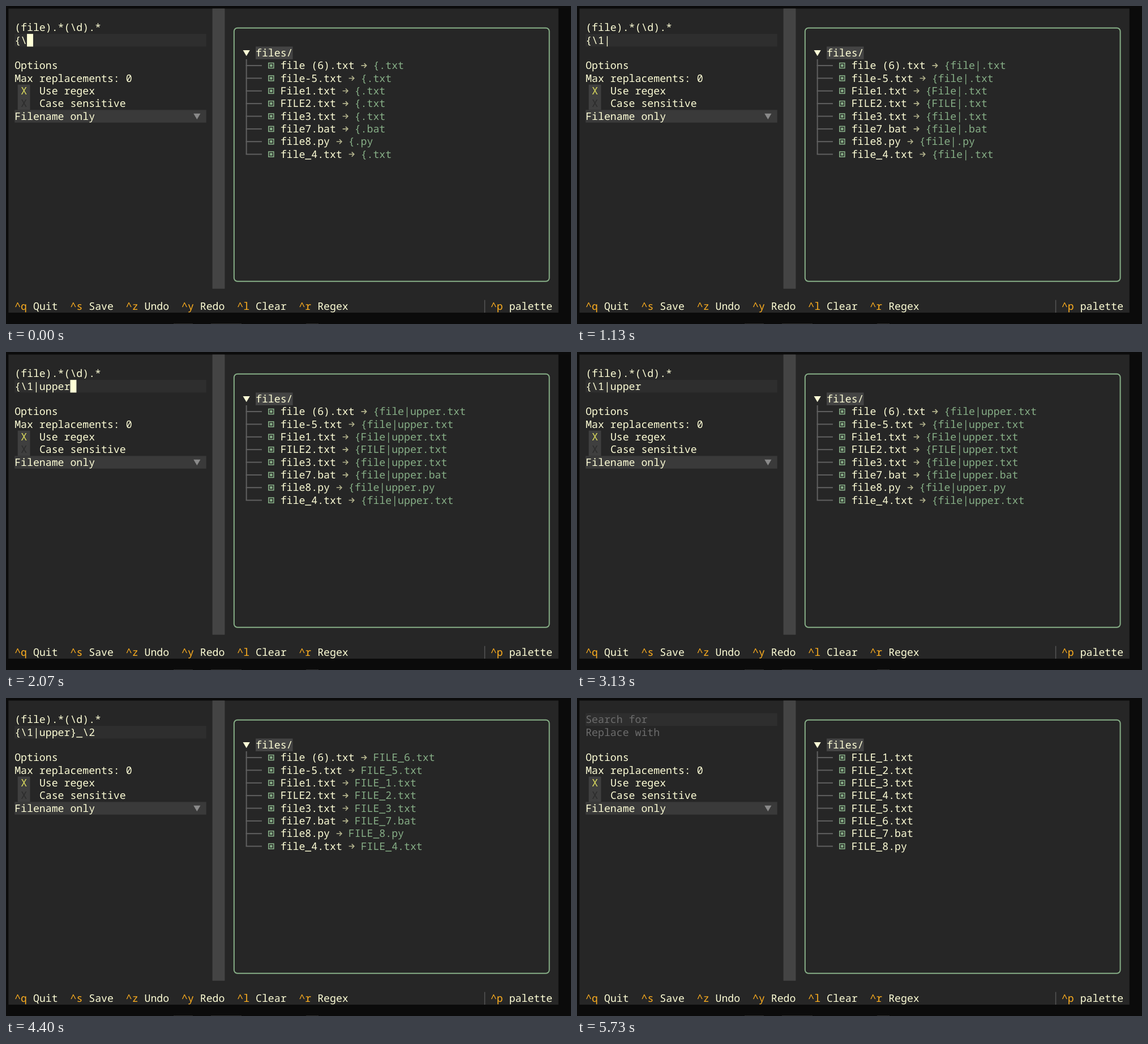
Write an HTML page that moves like this. It is 998 px wide and 561 px high and loops after 6 s.

```html
<!DOCTYPE html>
<html lang="en">
<head>
<meta charset="utf-8">
<title>Batch rename</title>
<style>
  html, body { margin: 0; width: 100%; height: 100%; overflow: hidden; background: #0b0b0b; }
  svg { display: block; width: 100vw; height: 100vh; }
  text {
    font: 500 18.2px "Noto Sans Mono", "DejaVu Sans Mono", monospace;
    font-variant-ligatures: none; white-space: pre; fill: #ffffd7;
    text-rendering: geometricPrecision;
  }
  .key { fill: #ffaf1f; }
  .green { fill: #87af87; }
  .hint { fill: #6c6c6c; }
  .on { fill: #dfdf5f; }
  .off { fill: #2b2b2b; }
</style>
</head>
<body>
<svg id="stage" viewBox="0 0 998 561"></svg>
<script>
const CELL_W = 10.918, CELL_H = 22.354;
const col = c => 4.3 + c * CELL_W;
const row = r => 4.5 + r * CELL_H;
const mid = r => row(r + 0.5);
const stage = document.getElementById('stage');

function add(tag, attrs, parent = stage) {
  const node = document.createElementNS('http://www.w3.org/2000/svg', tag);
  for (const name in attrs) node.setAttribute(name, attrs[name]);
  parent.append(node);
  return node;
}

function text(c, r, content = '', cls = '', parent = stage) {
  const node = add('text', { x: col(c), y: row(r) + 17.4, class: cls }, parent);
  node.textContent = content;
  return node;
}

const block = (c, r, cols, rows, fill) =>
  add('rect', { x: col(c), y: row(r), width: cols * CELL_W, height: rows * CELL_H, fill });

const triangle = (c, r, fill) =>
  add('path', { d: `M${col(c) - 0.6} ${mid(r) - 4.8}h12.2l-6.1 10.2z`, fill });

const stroke = (d, color, width, parent) =>
  add('path', { d, fill: 'none', stroke: color, 'stroke-width': width }, parent);

// Window, divider and panel
stroke('M296 560.5h34M362 560.5h54M530 560.5h22', '#2a2a2a', 1);
add('rect', { x: 4.3, y: 4.5, width: 971.5, height: 536.5, fill: '#262626' });
add('rect', { x: col(33), y: 4.5, width: 2 * CELL_W, height: 494.3, fill: '#444' });
add('rect', { x: col(36.5), y: mid(1) + 0.7, width: 51 * CELL_W, height: 20 * CELL_H,
  rx: 6, fill: 'none', stroke: '#87af87', 'stroke-width': 2 });

// Inputs
const focusBar = block(1, 2, 31, 1, '#2e2e2e');
const search = text(1, 1);
const replace = text(1, 2);
const cursor = block(3, 2, 1, 1, '#ffffd7');

// Options
block(1.5, 6, 2, 2, '#3f3f3f');
block(1, 8, 31, 1, '#3a3a3a');
text(1, 4, 'Options');
text(1, 5, 'Max replacements: 0');
text(2, 6, 'X', 'on');
text(5, 6, 'Use regex');
text(2, 7, 'X', 'off');
text(5, 7, 'Case sensitive');
text(1, 8, 'Filename only');
triangle(30, 8, '#8a8a8a');

// Tree
block(40, 3, 6, 1, '#444');
triangle(38, 3, '#ffffd7');
text(40, 3, 'files/');
const trunk = col(38.5);
stroke(`M${trunk} ${row(4)}V${mid(11)}`, '#606060', 2);
for (let r = 4; r < 12; r++) {
  stroke(`M${trunk - 1} ${mid(r)}H${col(41)}`, '#606060', 2);
  add('rect', { x: col(42) + 1, y: mid(r) - 4.5, width: 9, height: 9,
    fill: 'none', stroke: '#87af87', 'stroke-width': 1.6 });
  add('rect', { x: col(42) + 3.3, y: mid(r) - 2.2, width: 4.4, height: 4.4, fill: '#87af87' });
}
const list = add('g', {});

// Footer
const keys = [[1, '^q', 'Quit'], [10, '^s', 'Save'], [19, '^z', 'Undo'], [28, '^y', 'Redo'],
  [37, '^l', 'Clear'], [47, '^r', 'Regex'], [78, '^p', 'palette']];
for (const [c, key, label] of keys) {
  text(c, 23, key, 'key');
  text(c + 3, 23, label);
}
stroke(`M${col(77) + 0.6} ${row(23)}v${CELL_H}`, '#585858', 1.4);

const before = ['file (6).txt', 'file-5.txt', 'File1.txt', 'FILE2.txt',
  'file3.txt', 'file7.bat', 'file8.py', 'file_4.txt'];

function rename(name, template) {
  const [stem, ext] = name.split('.');
  const [, word, digit] = stem.match(/(file).*(\d).*/i);
  const filled = template.replace('\\1', word).replace('\\2', digit).replace(/\\$/, '');
  return filled.replace(/\{(\w+)\|upper\}/, (_, s) => s.toUpperCase()) + '.' + ext;
}

const finalTemplate = '{\\1|upper}_\\2';
const after = before.map(name => rename(name, finalTemplate)).sort();

// Start time, typed characters, characters used by the preview, cursor shown
const steps = [
  [0, 2, 2, 1], [70, 3, 2, 1], [130, 3, 3, 1], [400, 4, 3, 1], [470, 4, 4, 1], [930, 4, 4, 0],
  [1470, 5, 4, 1], [1530, 6, 5, 1], [1600, 7, 6, 1], [1730, 8, 7, 1], [1800, 9, 9, 1],
  [2270, 9, 9, 0], [3400, 12, 12, 0], [4070, 12, 12, 1], [4130, 13, 12, 1],
  [4200, 13, 13, 1], [4400, 13, 13, 0], [5670, 0, 0, 0]
];

function setInput(node, value, hint) {
  node.textContent = value || hint;
  node.setAttribute('class', value ? '' : 'hint');
}

function drawList(template) {
  list.replaceChildren();
  (template ? before : after).forEach((name, i) => {
    const r = i + 4, end = 44 + name.length;
    text(44, r, name, '', list);
    if (!template) return;
    const x = col(end + 1), y = mid(r);
    stroke(`M${x + 0.8} ${y}h9M${x + 6} ${y - 4}l4 4l-4 4`, '#b5b58e', 1.6, list);
    text(end + 3, r, rename(name, template), 'green', list);
  });
}

function show([, typed, used, blink]) {
  setInput(search, typed ? '(file).*(\\d).*' : '', 'Search for');
  setInput(replace, finalTemplate.slice(0, typed), 'Replace with');
  focusBar.setAttribute('y', row(typed ? 2 : 1));
  cursor.setAttribute('x', col(1 + typed));
  cursor.setAttribute('visibility', blink ? 'visible' : 'hidden');
  drawList(finalTemplate.slice(0, used));
}

const start = performance.now();
let current;
function tick() {
  const t = (performance.now() - start) % 6000;
  const step = steps.findLast(s => s[0] <= t);
  if (step !== current) show(current = step);
  requestAnimationFrame(tick);
}
tick();
</script>
</body>
</html>
```
